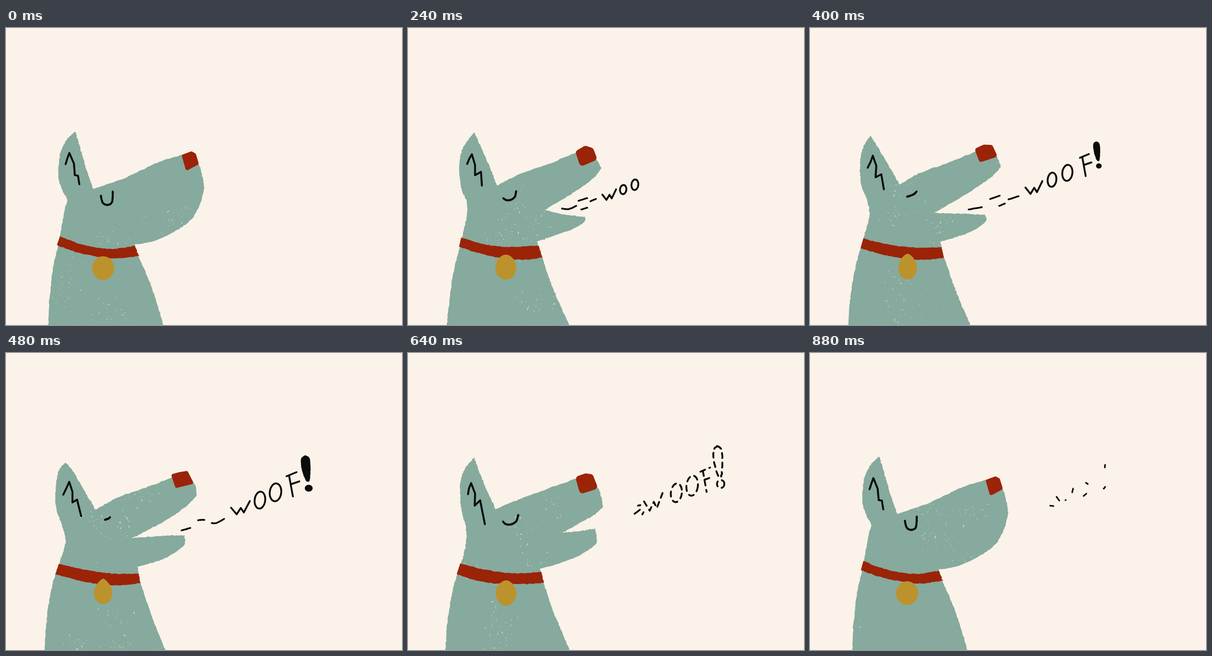
An HTML page with a canvas for the animation above (0.96 s loop, 864 by 648 pixels).

```html
<!DOCTYPE html>
<html lang="en">
<head>
<meta charset="utf-8">
<title>Woof</title>
<style>
html, body { margin: 0; width: 100%; height: 100%; overflow: hidden; background: #fbf2e9; }
canvas { display: block; width: 864px; height: 648px; }
</style>
</head>
<body>
<canvas id="stage" width="864" height="648" role="img" aria-label="A dog barks: WOOF!"></canvas>
<script>
const ctx = document.getElementById('stage').getContext('2d');
const PAPER = '#fbf2e9', FUR = '#86aa9d', RED = '#9b2308', GOLD = '#bc922c', INK = '#090c0b';
const STEP = 80, STEPS = 12;

// Key poses by step. "|" marks a corner; curves run smoothly between corners.
const poses = {};
const pose = (step, parts) => { poses[step] = parts; };

pose(0, {
  body: '92,655 95,590 103,522 113,478 122,430 127,402 134,376 | 115,330 118,277 133,243 151,226 | 161,258 175,308 191,351 | 258,328 335,292 404,272 | 424,305 432,346 | 432,347 432,348 432,348 | 432,349 432,350 | 424,382 407,414 375,440 328,463 281,473 | 290,500 312,550 329,600 345,655',
  collar: '117,454 165,472 230,482 281,475 | 290,497 | 235,503 165,492 111,474',
  nose: '383,277 405,269 414,274 421,297 393,312 4',
  tag: '212 498 24 524 550 .55',
  eye: '207,366 211,381 221,386 231,380 233,357',
  mark: '130,297 134,284 138,273 148,296 150,321 157,322 160,341',
  spots: '145,540 230,450 348,440 225,612 125,575 375,400'
});
pose(2, {
  body: '87,655 93,590 102,525 112,482 122,440 128,410 131,386 | 118,350 114,300 124,258 156,223 | 170,262 184,305 192,347 | 250,322 320,297 390,270 | 418,295 427,315 | 415,337 380,364 330,391 | 365,401 400,408 | 388,424 355,440 315,452 297,460 281,465 | 292,497 308,548 331,603 355,655',
  collar: '115,455 170,474 225,478 286,473 | 293,501 | 245,506 170,496 109,475',
  nose: '372,276 393,264 409,272 418,298 382,314 8',
  tag: '213 496 25 523 549 .55',
  eye: '208,371 214,381 224,383 234,375 234,356',
  mark: '131,292 135,281 142,275 148,300 152,318 162,309 165,341',
  spots: '322,332 292,382 315,600 275,565 228,640 150,375'
});
pose(4, {
  body: '82,655 88,590 101,520 113,478 123,435 130,402 125,368 | 114,345 110,300 116,265 134,231 | 148,258 172,300 196,341 | 245,313 310,290 390,253 | 407,282 417,296 | 390,322 340,356 266,403 | 310,411 374,417 | 379,424 362,438 335,449 308,458 282,466 | 291,495 309,548 332,605 356,655',
  collar: '118,459 175,473 230,477 285,476 | 292,501 | 240,505 170,495 113,479',
  nose: '358,262 380,249 399,253 409,276 370,292 7',
  tag: '214 493 20.5 524 549 .45',
  eye: '208,372 215,370 224,367 232,362 238,356',
  mark: '127,301 133,289 136,276 145,298 141,325 156,318 158,347',
  spots: '145,430 150,550 240,600 295,300 220,345 265,550'
});
pose(6, {
  body: '84,655 88,590 97,525 108,482 122,442 130,408 122,376 | 109,335 109,290 116,255 130,239 | 146,258 172,302 195,342 | 245,315 310,292 385,262 | 411,285 416,311 | 390,337 340,370 275,404 | 340,399 389,398 | 390,416 375,431 345,449 315,459 287,466 | 293,500 309,548 329,603 351,655',
  collar: '115,460 175,473 230,481 290,481 | 293,502 | 240,507 175,500 108,483',
  nose: '360,265 378,260 396,257 410,285 370,295 4',
  tag: '212 492 20 523 548 .12',
  eye: '216,364 219,363 221,362 224,361 227,358',
  mark: '125,309 132,295 138,281 145,303 145,326 155,320 164,356',
  spots: '240,380 235,570 155,632 250,635 185,355 300,310'
});
pose(7, {
  body: '82,655 86,590 97,520 107,486 121,445 127,405 122,370 | 114,330 112,280 120,253 138,231 | 152,260 172,298 192,338 | 250,308 320,284 390,262 | 412,295 420,336 | 385,355 345,376 299,402 | 345,400 393,393 | 396,410 388,428 355,449 325,461 287,468 | 293,500 310,550 334,605 354,655',
  collar: '113,460 175,473 230,478 289,479 | 295,504 | 250,507 170,500 106,485',
  nose: '358,266 379,259 397,261 411,292 370,305 8',
  tag: '214 496 22 522 551 .5',
  eye: '207,367 215,368 226,365 238,358 245,349',
  mark: '128,314 131,301 136,287 143,307 145,332 154,320 167,368',
  spots: '350,320 230,370 275,555 215,630 150,410 240,550'
});
pose(9, {
  body: '81,655 85,595 95,530 107,483 119,445 127,415 130,383 | 117,340 117,285 130,250 151,225 | 160,260 172,300 190,343 | 250,325 320,297 395,268 | 422,305 431,335 | 426,352 405,366 379,380 | 400,378 424,372 | 427,395 429,408 395,433 345,454 290,473 | 299,500 314,550 334,605 357,655',
  collar: '114,458 175,475 240,483 293,476 | 298,498 | 240,501 160,500 107,481',
  nose: '372,275 395,266 409,269 419,299 381,311 7',
  tag: '214 496 22.5 525 552 .35',
  eye: '208,369 212,379 223,383 234,376 236,358',
  mark: '134,302 135,290 140,281 150,307 146,334 161,323 168,379',
  spots: '295,325 270,400 120,590 185,605 160,540 300,350'
});
pose(11, { ...poses[0], spots: '255,340 350,350 265,390 290,415 105,605 330,445' });

// Each letter: glyph, left, top, width, height.
const words = {
  2: 'w 400 364 25 17/O 434 355 14 18',
  3: 'w 424 352 30 23/O 461 341 17 23/O 486 329 18 26',
  4: 'w 448 344 34 28/O 492 326 20 28/O 526 310 22 35/F 565 290 23 43',
  5: 'w 470 334 37 28/O 517 314 22 34/O 549 297 25 38/F 589 275 25 48/! 617 247 20 60',
  6: 'w 491 323 41 29/O 541 301 26 40/O 574 283 28 42/F 612 260 28 53/! 642 223 28 80',
  7: 'w 516 302 43 42/O 572 282 27 44/O 606 265 28 48/F 640 248 27 54/! 671 195 28 98',
  8: 'w 515 304 41 40/O 572 283 27 44/O 606 266 28 47/F 638 250 27 53/! 665 203 26 92'
};

const dashes = {
  2: '380,373 388,372/364,384 374,386 386,380/379,394 389,391',
  3: '336,394 351,395 367,388/372,377 391,371/378,396 391,392/398,378 410,373',
  4: '308,404 328,404 349,395/365,381 394,369/378,399 394,392/416,377 434,372',
  5: '346,396 375,391/393,373 414,366/413,388 425,383/433,374 455,367',
  6: '383,387 402,382/419,365 426,364 433,364/449,371 459,371 476,362',
  7: '488,355 509,341/499,331 507,330/509,356 515,349',
  8: '494,351 506,342/502,333 507,332/511,352 514,347',
  9: '506,333 510,333/505,342 512,340/517,324 525,329 532,337/535,332 536,327/546,326 547,325/557,311 559,304/572,290 580,286/592,284 596,290/574,306 575,318/592,325 599,327 606,324/609,303 614,309/633,287 634,295 632,304/636,268 645,276/641,226 642,235/680,241 680,246/665,286 666,286',
  11: '524,333 531,334/538,314 544,322/557,321 558,321/574,296 572,304/597,312 603,307/602,283 606,286/641,296 644,292/644,244 643,250'
};

let seed = 1;
function rand() {
  seed = (seed + 0x6d2b79f5) | 0;
  let t = Math.imul(seed ^ (seed >>> 15), 1 | seed);
  t = (t + Math.imul(t ^ (t >>> 7), 61 | t)) ^ t;
  return ((t ^ (t >>> 14)) >>> 0) / 4294967296;
}
const spread = r => (rand() + rand() + rand() - 1.5) * r;
const nums = s => s.match(/-?[\d.]+/g).map(Number);
const points = s => s.trim().split(/\s+/).map(p => p.split(',').map(Number));

function mix(a, b, k) {
  const target = nums(b);
  let i = 0;
  return a.replace(/-?[\d.]+/g, n => (+n + (target[i++] - n) * k).toFixed(2));
}

function poseAt(step) {
  if (poses[step]) return poses[step];
  const a = poses[step - 1], b = poses[step + 1], out = {};
  for (const part in a) out[part] = mix(a[part], b[part], 0.5);
  return out;
}

// Catmull-Rom samples through the points.
function curve(p, n = 14) {
  const out = [p[0]];
  for (let i = 0; i < p.length - 1; i++) {
    const a = p[i - 1] || p[i], b = p[i], c = p[i + 1], d = p[i + 2] || c;
    for (let j = 1; j <= n; j++) {
      const t = j / n;
      out.push([0, 1].map(k => b[k] + t / 2 * (c[k] - a[k]
        + t * (2 * a[k] - 5 * b[k] + 4 * c[k] - d[k] + t * (3 * (b[k] - c[k]) + d[k] - a[k])))));
    }
  }
  return out;
}

function trace(p, rough = 0, path = new Path2D()) {
  p.forEach(([x, y], i) => path[i ? 'lineTo' : 'moveTo'](x + spread(rough), y + spread(rough)));
  return path;
}

function outline(s) {
  let last, all = [];
  for (const run of s.split('|')) {
    const p = points(run);
    all = all.concat(curve(last ? [last, ...p] : p));
    last = p[p.length - 1];
  }
  const path = trace(all, 1);
  path.closePath();
  return path;
}

function nosePath(s) {
  const v = nums(s), r = v.pop(), path = new Path2D();
  const at = i => [v[(i % 5) * 2], v[(i % 5) * 2 + 1]];
  path.moveTo((v[0] + v[8]) / 2, (v[1] + v[9]) / 2);
  for (let i = 0; i < 5; i++) path.arcTo(...at(i), ...at(i + 1), r);
  path.closePath();
  return path;
}

function tagPath(s) {
  const [x, top, r, mid, low, k] = nums(s), path = new Path2D();
  const up = (mid - top) * 0.55, down = (low - mid) * 0.55;
  path.moveTo(x, top);
  path.bezierCurveTo(x + r * k, top, x + r, mid - up, x + r, mid);
  path.bezierCurveTo(x + r, mid + down, x + r * 0.55, low, x, low);
  path.bezierCurveTo(x - r * 0.55, low, x - r, mid + down, x - r, mid);
  path.bezierCurveTo(x - r, mid - up, x - r * k, top, x, top);
  return path;
}

function fill(path, color) {
  ctx.fillStyle = color;
  ctx.fill(path);
}

function ink(path, width) {
  ctx.strokeStyle = INK;
  ctx.lineWidth = width;
  ctx.stroke(path);
}

// Worn print: clumps of paper showing through, plus a fine even grain.
function wear(body, spots) {
  const fleck = (x, y, size) => {
    ctx.globalAlpha = 0.25 + rand() * 0.55;
    ctx.beginPath();
    ctx.ellipse(x, y, size * (0.5 + rand()), size * 0.45, rand() * 3, 0, 7);
    ctx.fill();
  };
  ctx.save();
  ctx.clip(body);
  ctx.fillStyle = PAPER;
  for (const [x, y] of points(spots)) {
    for (let i = 0; i < 48; i++) fleck(x + spread(38), y + spread(34), 0.4 + rand() ** 3 * 1.8);
  }
  for (let i = 0; i < 420; i++) fleck(80 + rand() * 350, 225 + rand() * 423, 0.3 + rand() * 0.5);
  ctx.restore();
}

const strokes = {
  w: ['0,.5 .3,1 .52,.52 .68,.86 1,0'],
  F: ['.2,.14 .5,1', '0,.17 .78,0', '.33,.5 1,.38']
};
const BANG = '.38,0 .73,.09 .8,.4 .74,.68 .58,.72 .38,.66 .1,.36 .06,.1 .38,0';

function letter(s, broken) {
  const [glyph] = s, [x, y, w, h] = nums(s.slice(1));
  const place = str => points(str).map(([u, v]) => [x + u * w, y + v * h]);
  const path = new Path2D();
  if (glyph === 'O') {
    path.ellipse(x + w / 2, y + h / 2, w / 2 - 1.5, h / 2 - 1.5, 0.12, 0, Math.PI * 2);
  } else if (glyph === '!') {
    trace(curve(place(BANG)), 0.5, path);
    path.closePath();
    path.moveTo(x + w * 0.97, y + h * 0.9);
    path.ellipse(x + w * 0.66, y + h * 0.9, w * 0.31, h * 0.095, 0, 0, Math.PI * 2);
    if (!broken) return fill(path, INK);
  } else {
    strokes[glyph].forEach(p => trace(place(p), 0, path));
  }
  ink(path, 4);
}

function drawSound(step) {
  const broken = step === 8;
  ctx.setLineDash(broken ? [11, 10] : []);
  if (words[step]) words[step].split('/').forEach(s => letter(s, broken));
  ctx.setLineDash([]);

  const fading = step === 10;
  const lines = dashes[fading ? 9 : step];
  if (!lines) return;
  lines.split('/').forEach((line, i) => {
    if (fading && i % 4 === 3) return;
    let p = points(line);
    if (fading) {
      const [cx, cy] = p[p.length >> 1];
      p = p.map(([x, y]) => [cx + (x - cx) * 0.65 + 3, cy + (y - cy) * 0.65 + 2]);
    }
    ink(trace(curve(p, 6), 0.3), step > 8 ? 3.4 : 3.8);
  });
}

function draw(step) {
  const p = poseAt(step);
  seed = 100 + step % 11;
  fill(trace([[0, 0], [864, 0], [864, 648], [0, 648]]), PAPER);
  const body = outline(p.body);
  fill(body, FUR);
  seed = 500 + step;
  wear(body, p.spots);
  fill(outline(p.collar), RED);
  fill(tagPath(p.tag), GOLD);
  fill(nosePath(p.nose), RED);
  ctx.lineCap = ctx.lineJoin = 'round';
  ink(trace(curve(points(p.eye)), 0.3), 4.4);
  ink(trace(curve(points(p.mark), 1), 0.3), 4.2);
  drawSound(step);
}

const start = performance.now();
let shown = -1;
function tick() {
  const step = Math.floor((performance.now() - start) / STEP) % STEPS;
  if (step !== shown) draw(shown = step);
  requestAnimationFrame(tick);
}
tick();
</script>
</body>
</html>
```
